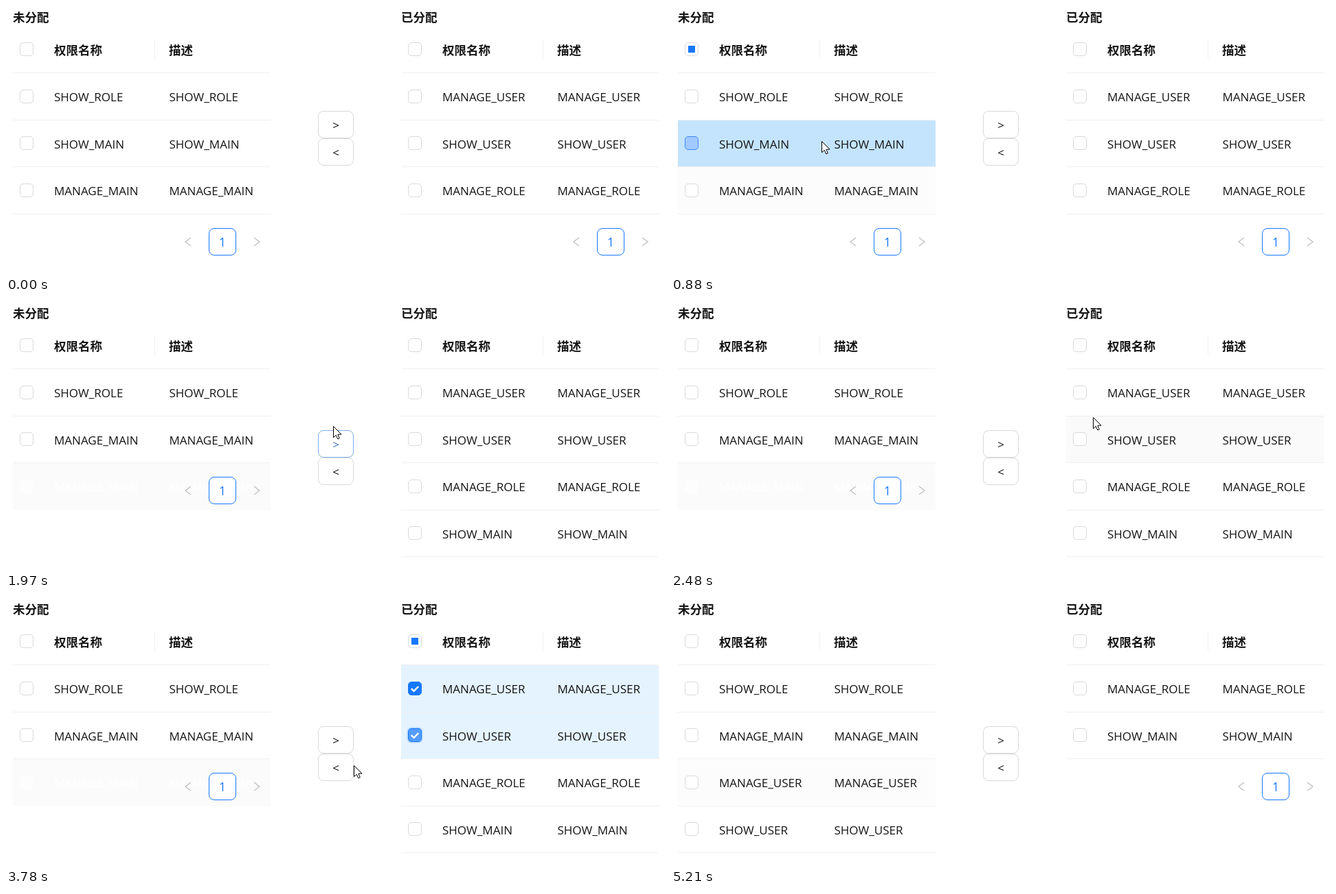
These frames come from a looping animation (959 by 391 pixels, 6.76 s). An HTML page with a canvas:

```html
<!DOCTYPE html>
<html lang="zh">
<head>
<meta charset="utf-8">
<title>权限分配</title>
<style>
html, body { margin: 0; width: 100%; height: 100%; overflow: hidden; background: #fff; }
canvas { display: block; }
</style>
</head>
<body>
<canvas id="stage" width="959" height="391"></canvas>
<script>
const g = document.getElementById('stage').getContext('2d');
const LOOP = 6760, MOVE_RIGHT = 1920, MOVE_LEFT = 4220;
const CURSOR_IN = 130, CURSOR_OUT = 5210;

const LATIN = '17px "Open Sans", "Noto Sans", sans-serif';
const BOLD = 'bold 17.5px "Noto Sans CJK SC", "Noto Sans CJK", sans-serif';
const DIGIT = '500 17.5px "Open Sans", "Noto Sans", sans-serif';

const WHITE = [255, 255, 255], HOVER = [250, 250, 250], ACTIVE = [186, 224, 255], PICKED = [228, 243, 255];
const BLUE = [22, 119, 255], SKY = [84, 156, 255], GREY = [217, 217, 217], INK = [20, 20, 20];

const rgb = c => `rgb(${c.map(Math.round)})`;
const mix = (a, b, k) => a.map((v, i) => v + (b[i] - v) * k);
const fade = (t, start, length) => Math.min(1, Math.max(0, (t - start) / length));
const smooth = k => k * k * (3 - 2 * k);

const lineY = i => Math.round(97 + 68.55 * i);
const midY = i => Math.round(131.8 + 68.55 * i);
const textY = i => Math.round(139 + 68.55 * i);

const row = (name, fill = WHITE) => ({ name, fill, check: 0, tick: 0, halo: 0 });

// A row that is hovered, clicked and left again
function picked(name, t, hover, click, leave) {
  let fill = mix(WHITE, HOVER, fade(t, hover, 100));
  fill = mix(fill, ACTIVE, fade(t, click, 90));
  fill = mix(fill, PICKED, fade(t, leave, 170));
  return { name, fill, check: fade(t, click, 190), tick: fade(t, click + 75, 70), halo: 0 };
}

function rows(t) {
  const trace = mix(WHITE, HOVER, .6 * fade(t, 500, 100));
  if (t < MOVE_RIGHT) return {
    left: [row('SHOW_ROLE'), picked('SHOW_MAIN', t, 690, 805, 1250), row('MANAGE_MAIN', trace)],
    right: ['MANAGE_USER', 'SHOW_USER', 'MANAGE_ROLE'].map(s => row(s))
  };
  if (t >= MOVE_LEFT) return {
    left: [row('SHOW_ROLE'), row('MANAGE_MAIN'), row('MANAGE_USER', trace), row('SHOW_USER')],
    right: [row('MANAGE_ROLE'), row('SHOW_MAIN')]
  };
  const second = picked('SHOW_USER', t, 2300, 3370, 3600);
  second.halo = fade(t, 3370, 100) - fade(t, 3830, 130);
  return {
    left: [row('SHOW_ROLE'), row('MANAGE_MAIN')],
    right: [picked('MANAGE_USER', t, 2640, 2925, 3060), second, row('MANAGE_ROLE'), row('SHOW_MAIN')]
  };
}

// Cursor moves: start, end, target and upward bend
const MOVES = [
  { from: CURSOR_IN, to: 800, x: 219, y: 197, bend: -15 },
  { from: 960, to: 1500, x: 454, y: 179 },
  { from: 1530, to: 1730, x: 476, y: 181 },
  { from: 2080, to: 2480, x: 614, y: 168 },
  { from: 2530, to: 2800, x: 597, y: 134 },
  { from: 2900, to: 3030, x: 604, y: 182 },
  { from: 3100, to: 3280, x: 597, y: 204 },
  { from: 3480, to: 3780, x: 506, y: 244 },
  { from: 3830, to: 3980, x: 494, y: 245 },
  { from: 4950, to: CURSOR_OUT, x: 709, y: 351, bend: 120 }
];

function pointer(t) {
  let x = 735, y = 318;
  for (const m of MOVES) {
    const k = smooth(fade(t, m.from, m.to - m.from));
    x += (m.x - x) * k;
    y += (m.y - y) * k - (m.bend || 0) * Math.sin(Math.PI * k);
    if (k < 1) break;
  }
  return [x, y];
}

function box(x, y, w, h, r, fill, line) {
  g.beginPath();
  g.roundRect(x + .5, y + .5, w - 1, h - 1, r);
  g.fillStyle = fill;
  g.fill();
  if (!line) return;
  g.strokeStyle = line;
  g.lineWidth = 1;
  g.stroke();
}

function rule(x, y, w, h, color = '#f0f0f0') {
  g.fillStyle = color;
  g.fillRect(x, y, w, h);
}

function label(s, x, y, font, color = rgb(INK), align = 'left') {
  g.font = font;
  g.fillStyle = color;
  g.textAlign = align;
  g.fillText(s, x, y);
}

function stroke(points, color, width) {
  g.beginPath();
  points.forEach(([x, y]) => g.lineTo(x, y));
  g.strokeStyle = color;
  g.lineWidth = width;
  g.stroke();
}

function outline() {
  g.closePath();
  g.fillStyle = '#fff';
  g.fill();
  g.strokeStyle = '#000';
  g.lineWidth = 1;
  g.stroke();
}

function checkbox(x, cy, { check, tick, halo }) {
  const y = cy - 10;
  if (halo) box(x - 2, y - 2, 24, 24, 6, `rgba(22,119,255,${.2 * halo})`);
  const edge = mix(GREY, BLUE, Math.min(1, check * 2));
  box(x, y, 20, 20, 4.5, rgb(mix(WHITE, mix(BLUE, SKY, halo), check)), rgb(edge));
  if (!tick) return;
  g.save();
  g.translate(x + 10, cy);
  g.scale(tick, tick);
  stroke([[-5.2, .1], [-1.5, 3.8], [5.2, -2.9]], '#fff', 2.4);
  g.restore();
}

function pager(x, cy) {
  const arrow = (cx, d) => stroke([[cx - 4 * d, cy - 6], [cx + 4 * d, cy], [cx - 4 * d, cy + 6]], '#bfbfbf', 1.3);
  arrow(x + 255, -1);
  arrow(x + 355, 1);
  box(x + 285, cy - 20, 40, 40, 7.5, '#fff', rgb(BLUE));
  label('1', x + 305, cy + 7, DIGIT, rgb(BLUE), 'center');
}

function table(x, title, list) {
  label(title, x, 23, BOLD);
  label('权限名称', x + 60, 71, BOLD);
  label('描述', x + 227, 71, BOLD);
  checkbox(x + 10, 63, row(''));
  if (list.some(r => r.check)) rule(x + 15, 58, 10, 10, rgb(BLUE));
  rule(x + 206, 49, 1, 28);
  rule(x, 97, 375, 1);
  list.forEach((r, i) => {
    const top = lineY(i), end = lineY(i + 1);
    rule(x, top + 1, 375, end - top, rgb(r.fill));
    rule(x, end, 375, 1);
    checkbox(x + 10, midY(i), r);
    label(r.name, x + 60, textY(i), LATIN);
    label(r.name, x + 227.5, textY(i), LATIN);
  });
  pager(x, lineY(list.length) + 41);
}

// Shade and pale trace left where the third row was
function vacated() {
  rule(10, 235, 375, 69, '#fbfbfb');
  box(20, 259, 20, 20, 4.5, '#fdfdfd');
  for (const x of [70, 237.5]) label('MANAGE_MAIN', x, textY(2), LATIN, '#fff');
}

function button(s, y, hot) {
  box(454, y, 52, 40, 7.5, '#fff', rgb(mix(GREY, SKY, hot)));
  label(s, 480, y + 27, LATIN, rgb(mix(INK, SKY, hot)), 'center');
}

function arrowCursor(x, y) {
  g.beginPath();
  [[0, 0], [0, 16.2], [3.8, 12.8], [6.3, 18.4], [8.8, 17.3], [6.4, 11.8], [11.5, 11.6]]
    .forEach(([a, b]) => g.lineTo(x + a + .5, y + b + .5));
  outline();
}

function handCursor(x, y) {
  g.save();
  g.translate(x - 6, y);
  g.beginPath();
  g.moveTo(5, 13);
  g.lineTo(5, 2);
  g.quadraticCurveTo(6.5, -.6, 8, 2);
  g.lineTo(8, 8);
  for (let i = 1; i < 4; i++) g.quadraticCurveTo(7 + 3 * i, 5 + i, 8 + 3 * i, 7 + i);
  g.lineTo(17, 15);
  g.quadraticCurveTo(16, 18, 14.5, 19);
  g.lineTo(14.5, 21.5);
  g.lineTo(6, 21.5);
  g.lineTo(6, 19.5);
  g.lineTo(.8, 13);
  g.quadraticCurveTo(1.5, 9.5, 5, 13);
  outline();
  for (const a of [8, 11, 14]) stroke([[a, 8], [a, 11.5]], '#000', 1);
  g.restore();
}

function cursor(t, buttonY, data) {
  if (t < CURSOR_IN || t >= CURSOR_OUT) return;
  const [x, y] = pointer(t);
  const inside = (a, b, w, h) => x > a && x < a + w && y > b && y < b + h;
  const onBox = (left, list) => list.some((_, i) => inside(left, midY(i) - 10, 20, 20));
  const hand = inside(454, buttonY, 52, 80) || onBox(20, data.left) || onBox(585, data.right);
  (hand ? handCursor : arrowCursor)(x, y);
}

function draw(t) {
  const data = rows(t);
  const buttonY = t < MOVE_RIGHT ? 153 : 187;
  rule(0, 0, 959, 391, '#fff');
  if (t >= MOVE_RIGHT && t < MOVE_LEFT) vacated();
  table(10, '未分配', data.left);
  table(575, '已分配', data.right);
  button('>', buttonY, fade(t, 1560, 160) - fade(t, MOVE_RIGHT, 160));
  button('<', buttonY + 40, fade(t, 3850, 170) - fade(t, 4950, 150));
  cursor(t, buttonY, data);
}

function tick() {
  draw(performance.now() % LOOP);
  requestAnimationFrame(tick);
}
tick();
</script>
</body>
</html>
```
